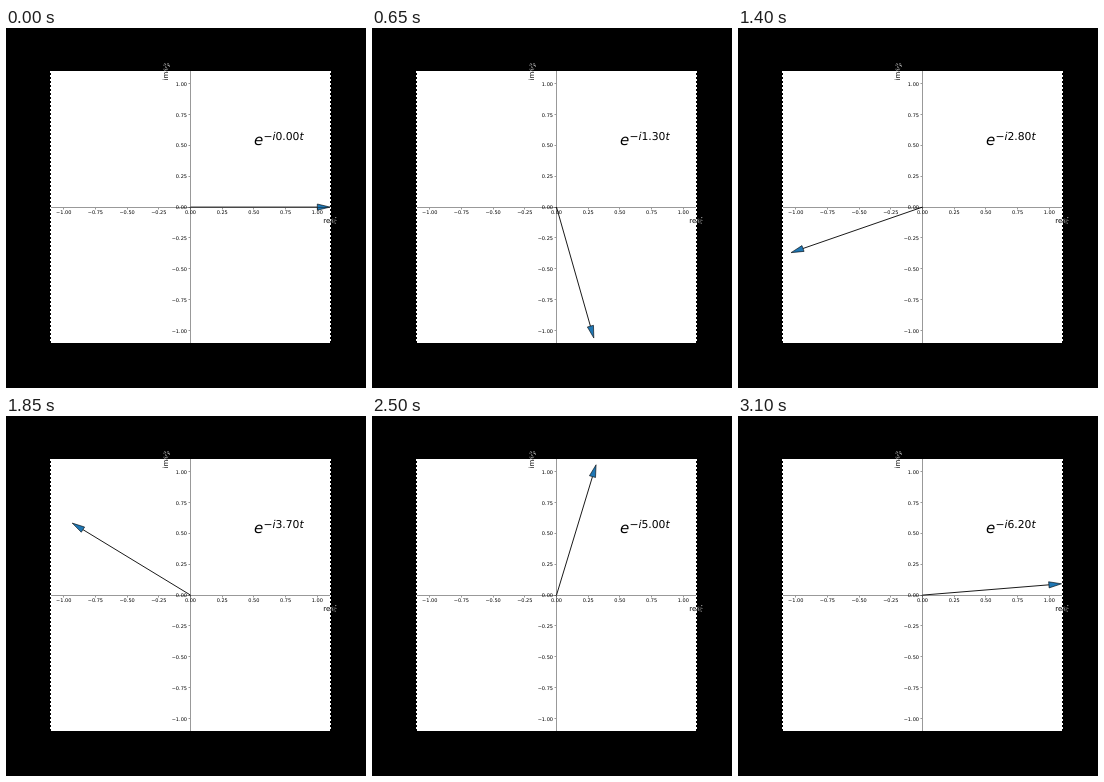
These frames come from a looping animation (360 by 360 pixels, 3.15 s). An HTML page:

```html
<!DOCTYPE html>
<html lang="en">
<head>
<meta charset="utf-8">
<title>Rotating phasor</title>
<style>
  html, body { margin: 0; width: 100%; height: 100%; overflow: hidden; background: #000; }
  svg { display: block; width: 100vw; height: 100vh; }
  text { font-family: "DejaVu Sans", sans-serif; text-rendering: geometricPrecision; }
  .tick text { font-size: 5px; }
  .name { font-size: 7px; }
  .halo { fill: #000; stroke: #fff; stroke-width: .9; stroke-dasharray: 1 2; paint-order: stroke; }
  .fringe { fill: none; stroke: #fff; stroke-dasharray: 2 2; shape-rendering: crispEdges; }
  .axis { fill: #000; opacity: .4; }
  .it { font-style: oblique; }
</style>
</head>
<body>
<svg viewBox="0 0 360 360">
  <defs>
    <clipPath id="inside"><rect x="45" y="43" width="279" height="272"/></clipPath>
    <clipPath id="outside"><path d="M0 0H360V43H0ZM324 43H360V315H324Z"/></clipPath>
    <g id="names" class="name">
      <text x="317.3" y="194.9">real</text>
      <text transform="translate(161.9 52.5) rotate(-90)">imag</text>
    </g>
  </defs>
  <rect width="360" height="360"/>
  <rect x="45" y="43" width="279" height="272" fill="#fff"/>
  <path class="fringe" d="M44.5 43V315M324.5 43V315"/>
  <g clip-path="url(#inside)">
    <path id="shaft" fill="none" stroke="#000" stroke-width=".9"/>
    <path id="head" fill="#1f77b4" stroke="#000" stroke-width=".6"/>
  </g>
  <rect class="axis" x="45" y="179" width="279" height="1"/>
  <rect class="axis" x="184" y="43" width="1" height="272"/>
  <g id="ticks" class="tick"></g>
  <use href="#names" class="halo" clip-path="url(#outside)"/>
  <use href="#names" clip-path="url(#inside)"/>
  <text x="247.9" y="117.3" font-size="15" class="it">e</text>
  <text x="257.4" y="111.6" font-size="10.8">−<tspan class="it">i</tspan><tspan id="omega">0.00</tspan><tspan class="it">t</tspan></text>
</svg>
<script>
const STEP = 50, COUNT = 63;
const $ = id => document.getElementById(id);
const px = x => 184.5 + x * 126.82;
const py = y => 179.1 - y * 123.55;

function add(tag, attrs, text = "") {
  const el = document.createElementNS("http://www.w3.org/2000/svg", tag);
  for (const key in attrs) el.setAttribute(key, attrs[key]);
  el.textContent = text;
  $("ticks").append(el);
}

for (let i = -4; i <= 4; i++) {
  const v = i / 4, x = px(v), y = py(v);
  const label = v.toFixed(2).replace("-", "−");
  add("rect", { class: "axis", x: Math.floor(x), y: 180, width: 1, height: 1.5 });
  add("rect", { class: "axis", x: 182.5, y: Math.floor(y), width: 1.5, height: 1 });
  add("text", { x, y: 186.3, "text-anchor": "middle" }, label);
  add("text", { x: 181, y: y + 2.1, "text-anchor": "end" }, label);
}

// Point at distance r along the arrow and s to its side, in data units.
function point(a, r, s) {
  const c = Math.cos(a), n = Math.sin(a);
  return px(r * c - s * n).toFixed(2) + " " + py(r * n + s * c).toFixed(2);
}

function draw(t) {
  const w = Math.floor(t / STEP) % COUNT / 10;
  $("shaft").setAttribute("d", `M${point(-w, 0, 0)}L${point(-w, 1, 0)}`);
  $("head").setAttribute("d",
    `M${point(-w, 1, 0.025)}L${point(-w, 1.1, 0)}L${point(-w, 1, -0.025)}Z`);
  $("omega").textContent = w.toFixed(2);
}

const start = performance.now();
function tick() {
  draw(performance.now() - start);
  requestAnimationFrame(tick);
}
tick();
</script>
</body>
</html>
```
